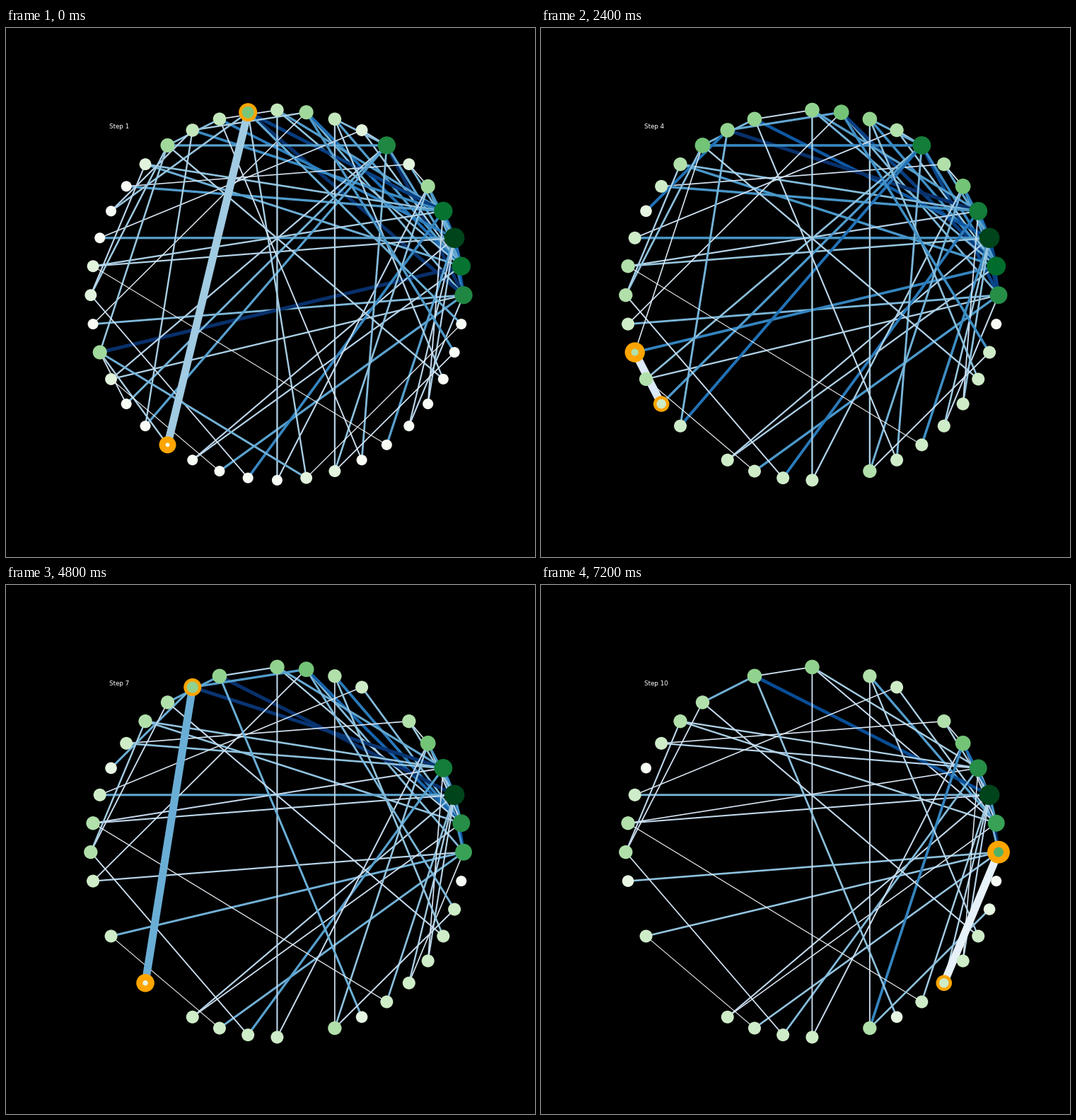
Recreate the animation shown at these times as a matplotlib script. Size 748 by 748 pixels, loop 8 s.

```python
import numpy as np
import matplotlib.pyplot as plt
from matplotlib.animation import FuncAnimation
from matplotlib.collections import LineCollection

SIZE, DPI = 748, 88
PT = 72 / DPI  # points per pixel
N, HUBS = 40, 4

# The walker's path, then further chains of linked nodes.
WALK = [26, 11, 31, 22, 24, 6, 25, 13, 9, 0, 35]
STRANDS = [
    WALK,
    [18, 7, 6, 23, 28, 0, 3, 19, 34],
    [5, 2, 36, 3, 10, 1, 15, 20, 29],
    [16, 5, 4, 30, 10, 12, 14, 6, 33, 12],
    [26, 22, 14, 37, 8, 32, 38, 9, 21],
    [31, 39, 11, 17, 13],
    [15, 3, 11, 0], [14, 20], [6, 8], [4, 32], [1, 22],
]
STEPS = len(WALK) - 1

angle = 2 * np.pi * np.arange(N) / N
POS = np.column_stack([383.4 + 263.6 * np.cos(angle),
                       377.7 - 261.7 * np.sin(angle)])


def grow():
    """Give each node two older links, filling gaps from a hub wave."""
    older = {n: set() for n in range(N)}
    for strand in STRANDS:
        for a, b in zip(strand, strand[1:]):
            older[max(a, b)].add(min(a, b))
    for n in range(2, N):
        swing = min(0.12 * n, 1.6)
        wave = 1.6 + swing * np.sin(np.pi * (n - 11) / 8)
        free = set(range(min(n, HUBS))) - older[n]
        nearest = sorted(free, key=lambda hub: abs(hub - wave))
        older[n].update(nearest[:2 - len(older[n])])
    return sorted((a, b) for b in older for a in older[b])


EDGES = grow()


def betweenness(nodes, edges):
    """Shortest-path betweenness of every edge (Brandes)."""
    near = {n: [] for n in nodes}
    for a, b in edges:
        near[a].append(b)
        near[b].append(a)
    score = dict.fromkeys(edges, 0.0)
    for root in nodes:
        dist, paths, order = {root: 0}, {root: 1}, [root]
        for a in order:
            for b in near[a]:
                if b not in dist:
                    dist[b], paths[b] = dist[a] + 1, 0
                    order.append(b)
                if dist[b] == dist[a] + 1:
                    paths[b] += paths[a]
        flow = dict.fromkeys(order, 0.0)
        for b in reversed(order):
            for a in near[b]:
                if dist[a] == dist[b] - 1:
                    part = paths[a] / paths[b] * (1 + flow[b])
                    flow[a] += part
                    score[min(a, b), max(a, b)] += part / 2
    return np.array([score[e] for e in edges])


def scale(values):
    values = np.asarray(values, float)
    return (values - values.min()) / (values.max() - values.min())


fig = plt.figure(figsize=(SIZE / DPI, SIZE / DPI), dpi=DPI, facecolor="black")
ax = fig.add_axes([0, 0, 1, 1])


def draw(step):
    ax.clear()
    ax.set_xlim(0, SIZE)
    ax.set_ylim(SIZE, 0)
    ax.axis("off")

    here, target = WALK[step], WALK[step + 1]
    gone = set(WALK[:step])
    nodes = [n for n in range(N) if n not in gone]
    edges = [e for e in EDGES if not gone & set(e)]

    # Edges: width and colour follow betweenness.
    load = scale(betweenness(nodes, edges))
    width = 1 + 4 * load
    active = edges.index((min(here, target), max(here, target)))
    width[active] = 11
    order = [i for i in range(len(edges)) if i != active] + [active]
    ax.add_collection(LineCollection(
        [POS[list(edges[i])] for i in order], linewidths=width[order] * PT,
        colors=plt.cm.Blues(load[order]), snap=False, zorder=1))

    # Nodes: area follows degree, colour its logarithm.
    degree = scale([sum(n in e for e in edges) for n in nodes])
    rings = {here: 9, target: 4.5}
    order = sorted(range(len(nodes)), key=lambda i: nodes[i] in rings)
    shown = [nodes[i] for i in order]
    ax.scatter(*POS[shown].T, s=(225 + 592 * degree[order]) * PT ** 2,
               c=plt.cm.Greens(np.log2(1 + degree[order])),
               edgecolors="orange",
               linewidths=[rings.get(n, 0) * PT for n in shown], zorder=2)

    ax.text(146.2, 142.4, f"Step {step + 1}", color="white",
            family="DejaVu Sans", size=8.7 * PT, va="baseline")
    return []


anim = FuncAnimation(fig, draw, frames=STEPS, init_func=lambda: [],
                     interval=800, repeat=True, repeat_delay=0)
plt.show()
```
